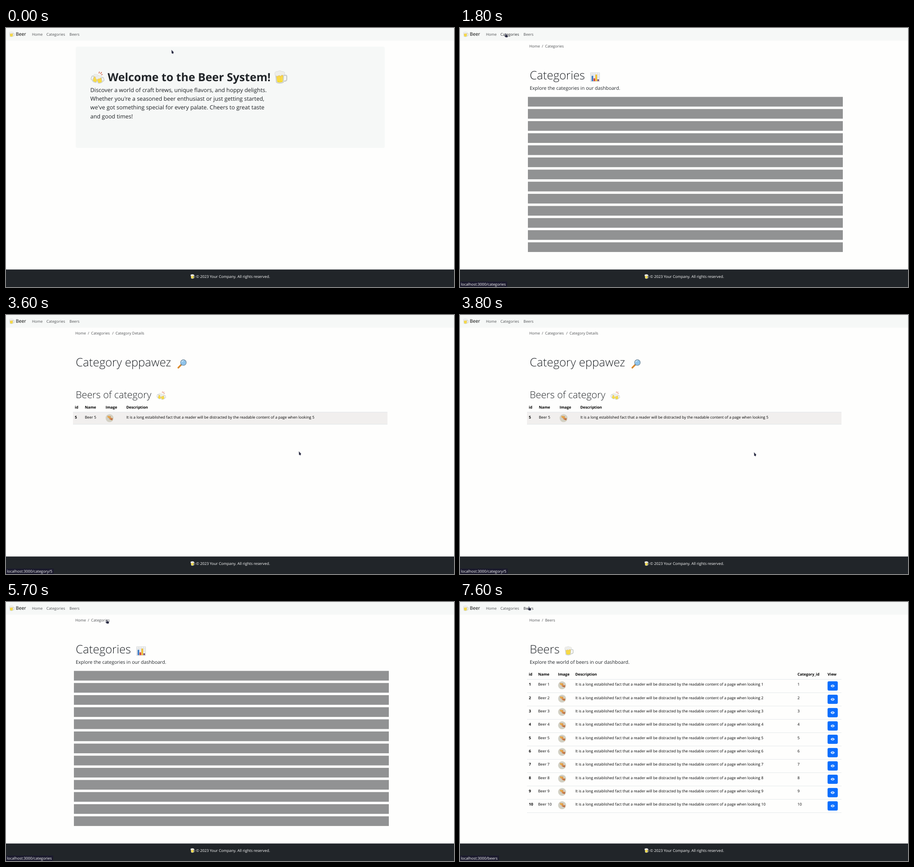
Recreate the animation shown at these times as an HTML page. Size 983x570 px, loop 8 s.

```html
<!DOCTYPE html>
<html lang="en">
<head>
<meta charset="utf-8">
<title>Beer</title>
<style>
html, body { margin: 0; width: 100%; height: 100%; overflow: hidden; background: #fefefd; }
svg { display: block; }
text { font: 470 8.28px "Open Sans", "Noto Sans", sans-serif; text-rendering: geometricPrecision; fill: #000; white-space: pre; }
.bold { font-weight: 700; }
.link { fill: #505255; }
.link.hover { fill: #282b2e; }
.brand { font-size: 10.3px; }
.hero { font-size: 24.6px; font-weight: 700; fill: #212529; }
.intro { font-size: 12.42px; font-weight: 450; fill: #1c2024; }
.title { font-size: 25.4px; font-weight: 340; fill: #212529; }
.sub { font-size: 21.2px; font-weight: 340; fill: #212529; }
.lead { font-size: 10.5px; font-weight: 370; fill: #212529; }
.white { fill: #fff; }
</style>
</head>
<body>
<svg id="stage" width="983" height="570" viewBox="0 0 983 570">
  <defs>
    <linearGradient id="ale" x2="0" y2="1"><stop stop-color="#f6c63c"/><stop offset="1" stop-color="#f5dc1d"/></linearGradient>
    <symbol id="mug" viewBox="0 0 30 30">
      <path d="M20 11h5q3 0 3 3v6q0 4-6 4" fill="none" stroke="#c9cdca" stroke-width="2.6"/>
      <path d="M3 7h19l-1 20q-9 4-16 0z" fill="#d5d8d2" stroke="#b9bdb8" stroke-width=".6"/>
      <path d="M5 10h15l-1 15q-7 3-12 0z" fill="url(#ale)"/>
      <path d="M9 13v11M13 13v12M17 13v11" stroke="#fbe77a" stroke-width="1.4"/>
      <path d="M2 8C1 4 5 2 8 3c3-3 8-2 9 0 5-1 8 2 6 6-1 3-4 2-6 1-1 3-4 3-5 1-3 1-6 3-7 1-2 1-3-1-3-4z" fill="#eeeeea" stroke="#cfd1cd" stroke-width=".7"/>
    </symbol>
    <symbol id="cheers" viewBox="0 0 30 30">
      <g transform="rotate(22 9 16)"><use href="#mug" transform="matrix(-.62 0 0 .68 19 6)" width="30" height="30"/></g>
      <g transform="rotate(-14 20 20)"><use href="#mug" x="11" y="9" width="19" height="20"/></g>
      <path d="M18 6l1-4M21 7l3-4M23 9l3-1" stroke="#d7664c" stroke-width="1.5"/>
    </symbol>
    <symbol id="chart" viewBox="0 0 30 30">
      <path d="M1 1h28v28H1z" fill="#f0f1f1" stroke="#c3c7c9"/>
      <path d="M1 8h28M1 15h28M1 22h28M8 1v28M15 1v28M22 1v28" stroke="#d0d5d8"/>
      <path d="M4 11h5v17H4z" fill="#3b78c4"/><path d="M10 19h5v9h-5z" fill="#d6453b"/>
      <path d="M16 7h5v21h-5z" fill="#f3bd26"/><path d="M22 22h5v6h-5z" fill="#7a4f70"/>
    </symbol>
    <symbol id="lens" viewBox="0 0 30 30">
      <path d="M3 27L12 18" stroke="#db8a2c" stroke-width="5" stroke-linecap="round"/>
      <path d="M11 19l3-3" stroke="#6c7a83" stroke-width="3"/>
      <circle cx="19" cy="11" r="9" fill="#8fc3ea" stroke="#6f8797" stroke-width="1.6"/>
      <path d="M13 10q2-5 7-5" fill="none" stroke="#d5ebfa" stroke-width="2"/>
    </symbol>
    <g id="photo">
      <circle r="8.7" fill="#d2d0c3"/>
      <path d="M-5-5L3-4 2-1 7 0 6 5 0 3-1 0-4-1z" fill="#d98e4c"/>
      <path d="M-4-4l5 1-1 2-4-1z" fill="#eeb640"/><path d="M1 2l6-1-2 3z" fill="#a8614a"/>
    </g>
    <g id="view">
      <rect width="22.4" height="20.4" rx="3" fill="#0d6efd"/>
      <path d="M6.7 10.2q4.500-6 9 0-4.500 6-9 0z" fill="#fff"/>
      <circle cx="11.2" cy="10.2" r="1.9" fill="#0d6efd"/><circle cx="11.2" cy="10.2" r="1" fill="#fff"/>
    </g>
  </defs>
  <rect width="983" height="570" fill="#fefefd"/>
  <rect width="983" height="27.7" fill="#f6f8f7"/>
  <rect y="531.5" width="983" height="38.5" fill="#212529"/>
  <g id="frame"></g>
  <g id="pages"></g>
  <g id="status"><rect y="558" height="12" fill="#1b1a2d"/><text class="white" x="2" y="567"></text></g>
  <g id="cursor">
    <path id="arrow" d="M0 0L5 5.200 4.300 7 3.500 9.300 1.600 7.800.400 8z" fill="#26283f" stroke="#b9bbc4" stroke-width=".5"/>
    <path id="hand" d="M-.600.600Q.300-.500 1 .600L1.300 3.300 4.600 4 5 6.500 4.200 8.600H.200L-2.800 5.300-1.800 4.600-.300 5z" fill="#26283f" stroke="#b9bbc4" stroke-width=".4"/>
  </g>
</svg>
<script>
const $ = id => document.getElementById(id);
const text = (s, x, y, cls = '') => `<text x="${x}" y="${y}" class="${cls}">${s}</text>`;
const icon = (id, x, y, size) => `<use href="#${id}" x="${x}" y="${y}" width="${size}" height="${size}"/>`;
const put = (id, x, y) => `<use href="#${id}" x="${x}" y="${y}"/>`;
const line = y => `<path d="M147 ${y}H837" stroke="#dee2e6" stroke-width=".8"/>`;
const each = (n, fn) => Array.from({ length: n }, (_, i) => fn(i)).join('');
const heads = (names, xs, y) => names.map((s, i) => text(s, xs[i], y, 'bold')).join('');
const fact = n => 'It is a long established fact that a reader will be distracted by the readable content of a page when looking ' + n;

function crumbs(...names) {
  const xs = [152, 186.7, 240.3];
  return names.map((s, i) => (i ? text('/', xs[i] - 7.3, 43, 'link') : '') + text(s, xs[i], 43, 'link')).join('');
}

function table(names, xs, cells) {
  return heads(names, xs, 162.4) + line(170.3) + each(10, i => {
    const y = 170.3 + i * 29.33;
    return text(i + 1, xs[0], y + 14.1, 'bold') + cells(i + 1, y + 14.1, y) +
      put('view', xs[xs.length - 1], y + 4.3) + line(y + 29.33);
  });
}

const words = 'perdu not na hiv eppawez jubges go wugbeweb gi geztieho'.split(' ');
const intro = ['Discover a world of craft brews, unique flavors, and hoppy delights.',
  "Whether you're a seasoned beer enthusiast or just getting started,",
  "we've got something special for every palate. Cheers to great taste", 'and good times!'];
const listTop = crumbs('Home', 'Categories') + text('Categories', 153, 113, 'title') + icon('chart', 286, 97.5, 21) +
  text('Explore the categories in our dashboard.', 153, 136, 'lead');

const pages = {
  home: '<rect x="153" y="41" width="678" height="223" rx="4" fill="#f6f8f7"/>' +
    icon('cheers', 186, 94, 30) + text('Welcome to the Beer System!', 223, 117, 'hero') + icon('mug', 588, 93, 30) +
    intro.map((s, i) => text(s, 185, 141 + i * 19.2, 'intro')).join(''),
  loading: listTop + each(13, i => `<rect x="149" y="${151.6 + i * 26.67}" width="691" height="21.3" fill="#919293"/>`),
  list: listTop + table(['id', 'Name', 'View'], [151, 276.5, 629], (n, y) => text(words[n - 1], 276.5, y)),
  detail: crumbs('Home', 'Categories', 'Category Details') + text('Category eppawez', 153, 113, 'title') +
    icon('lens', 376, 97, 21) + text('Beers of category', 153, 183, 'sub') + icon('cheers', 330.5, 167, 20.5) +
    heads(['id', 'Name', 'Image', 'Description'], [151, 173, 218.5, 264], 206.2) +
    '<rect x="147" y="213.8" width="690" height="26.8" fill="#f1efee"/>' + line(213.8) + line(240.5) +
    text(5, 151, 228, 'bold') + text('Beer 5', 173, 228) + put('photo', 227.3, 227) + text(fact(5), 264, 228),
  beers: crumbs('Home', 'Beers') + text('Beers', 153, 113, 'title') + icon('mug', 228.5, 97, 21) +
    text('Explore the world of beers in our dashboard.', 153, 136, 'lead') +
    table(['id', 'Name', 'Image', 'Description', 'Category_id', 'View'], [151, 171.5, 215, 253, 740.5, 806.5], (n, y, top) =>
      text('Beer ' + n, 171.5, y) + put('photo', 224, top + 13) + text(fact(n), 253, y) + text(n, 740.5, y))
};

$('frame').innerHTML = icon('mug', 6.5, 7.5, 12.5) + text('Beer', 21.5, 17.2, 'brand') +
  text('Home', 57, 16.5, 'link') + text('Categories', 88.7, 16.5, 'link') + text('Beers', 139.3, 16.5, 'link') +
  icon('mug', 404.5, 541.5, 10.5) + text('© 2023 Your Company. All rights reserved.', 417, 549.6, 'white');
$('pages').innerHTML = Object.keys(pages).map(k => `<g id="${k}">${pages[k]}</g>`).join('');
const links = document.querySelectorAll('#frame .link');

// [start, value] lists hold each value until the next start
const shown = [[0, 'home'], [1800, 'loading'], [1900, 'list'], [3400, 'detail'], [5600, 'loading'], [5800, 'list'], [6800, 'home'], [7500, 'beers']];
const urls = [[0, ''], [1800, '/categories'], [2600, ''], [3300, '/category/5'], [4100, ''], [5600, '/categories'],
  [6200, '/'], [6900, ''], [7300, '/beers']];
const pointers = [[0, 'arrow'], [1500, 'hand'], [2600, 'arrow'], [3300, 'hand'], [3500, 'arrow'], [5400, 'hand'],
  [6000, 'arrow'], [6200, 'hand'], [6800, 'arrow'], [7300, 'hand']];
const hovers = [[0, -1], [1500, 1], [2600, -1], [7300, 2]];
const path = [[0, 363, 48], [100, 363, 48], [200, 362, 48], [500, 362, 48], [800, 310, 52], [1100, 190, 42], [1300, 104, 17],
  [1400, 95, 26], [1500, 98, 17], [1600, 100, 12], [2400, 100, 12], [2500, 100, 18], [2700, 210, 75], [3000, 580, 245],
  [3100, 682, 300], [3300, 640, 298], [3500, 640, 298], [3700, 645, 302], [4000, 645, 302], [4200, 665, 281],
  [4500, 560, 215], [4800, 350, 105], [5100, 235, 55], [5200, 229, 49], [5400, 221, 39], [5900, 221, 39],
  [6100, 200, 42], [6300, 180, 42], [6400, 180, 42], [6600, 169, 42], [6800, 169, 42], [7000, 161, 36],
  [7100, 161, 36], [7200, 155, 20], [7300, 152, 11], [7400, 152, 11], [7500, 151, 10], [8000, 151, 10]];
const at = (list, t) => list.findLast(p => p[0] <= t)[1];

function place(t) {
  const i = path.findIndex(p => p[0] > t), a = path[i - 1], b = path[i];
  const k = (t - a[0]) / (b[0] - a[0]);
  return [1, 2].map(j => a[j] + (b[j] - a[j]) * k);
}

function draw(now) {
  const t = Math.floor(now % 8000 / 100) * 100;
  const page = at(shown, t), url = at(urls, t), pointer = at(pointers, t), hover = at(hovers, t);
  for (const k in pages) $(k).style.display = k === page ? '' : 'none';
  for (const k of ['arrow', 'hand']) $(k).style.display = k === pointer ? '' : 'none';
  links.forEach((el, i) => el.classList.toggle('hover', i === hover));
  const [bar, caption] = $('status').children;
  $('status').style.display = url ? '' : 'none';
  if (url) {
    caption.textContent = 'localhost:3000' + (url === '/' ? '' : url);
    bar.setAttribute('width', caption.getComputedTextLength() + 5);
  }
  $('cursor').setAttribute('transform', `translate(${place(t)})`);
}

const start = performance.now();
function tick() {
  draw(performance.now() - start);
  requestAnimationFrame(tick);
}
tick();
</script>
</body>
</html>
```
